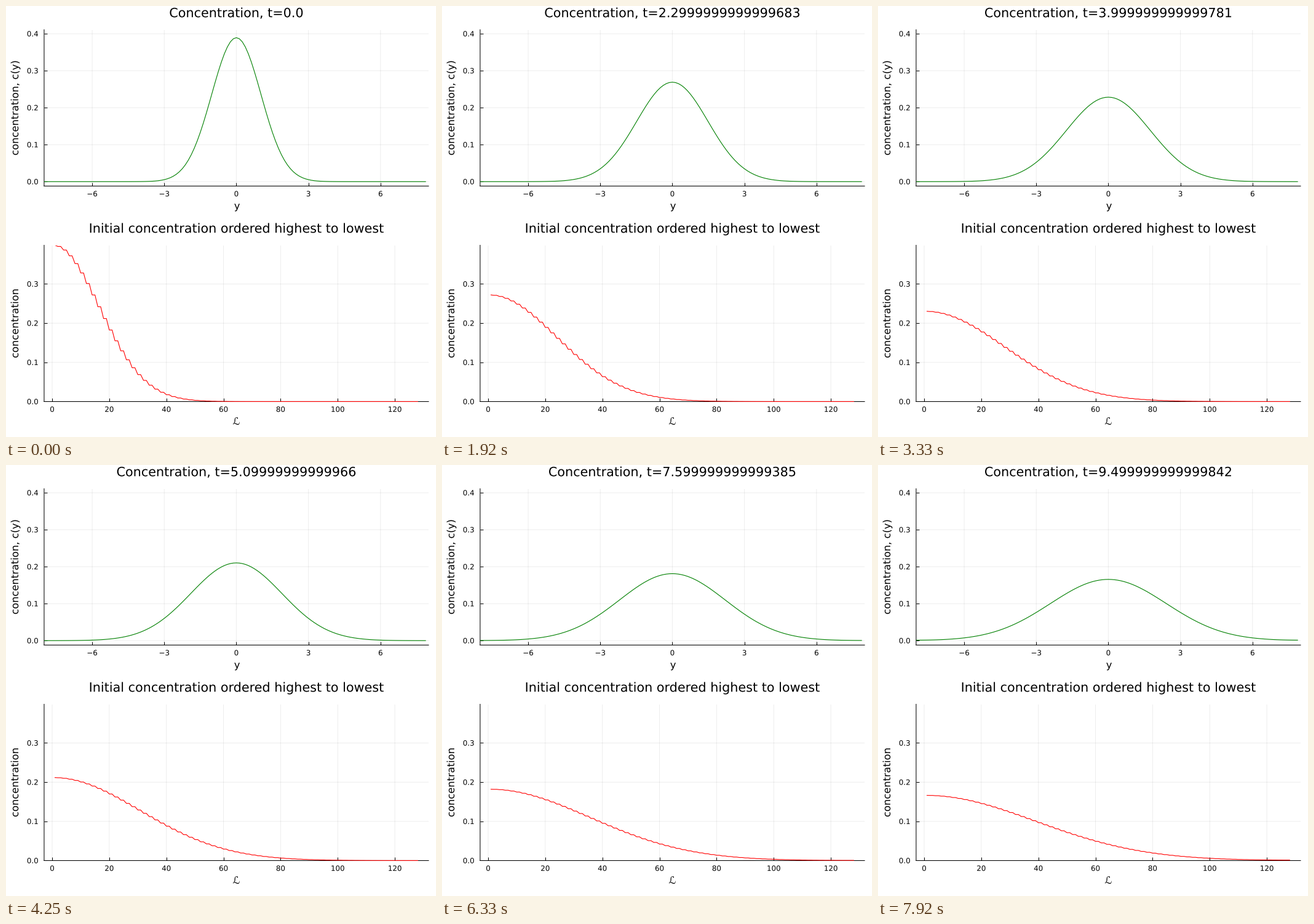
Animation of 699x700 px, one loop 8 s. Source, as a matplotlib script:

```python
from itertools import accumulate, repeat

import matplotlib.pyplot as plt
import numpy as np
from matplotlib.animation import FuncAnimation
from matplotlib.patches import PathPatch
from matplotlib.path import Path
from matplotlib.textpath import TextPath
from matplotlib.transforms import Affine2D

W, H, DPI = 699, 700, 100
LOOP_MS, TICK_MS, STATES = 8000, 20, 96
LEFT, RIGHT, HEIGHT = 61.95, 686.95, 253.95
MID = (LEFT + RIGHT) / 2
TITLE, LABEL, SMALL = 20.74, 16.3, 11.85
DT, STEPS = 0.002, 50

plt.rcParams.update({"font.family": "DejaVu Sans", "path.simplify": False})

# The clock is summed step by step, so its rounding drift shows in the title.
times = list(accumulate(repeat(DT, STEPS * (STATES - 1)), initial=0.0))[::STEPS]

y = -8 + 0.125 * np.arange(128)
rank = np.arange(1, 129)
peak = 1 / np.sqrt(2 * np.pi)


def concentration(t):
    """Spreading Gaussian on a periodic domain of width 16."""
    var = 1 + 0.5 * t
    waves = sum(np.exp(-(y + s) ** 2 / (2 * var)) for s in (-16, 0, 16))
    return waves / np.sqrt(2 * np.pi * var)


fig = plt.figure(figsize=(W / DPI, H / DPI), dpi=DPI, facecolor="white")
pixels = Affine2D().scale(1 / W, 1 / H) + fig.transFigure


def outline(text, size, x, base, align=0.5, turn=0):
    """Unhinted glyph outlines, aligned by advance width on a baseline."""
    def right_edge(s):
        return TextPath((0, 0), s, size=size).get_extents().x1

    width = right_edge(text + ".") - right_edge(".")
    place = Affine2D().translate(-align * width, 0).rotate_deg(turn)
    place.translate(x, H - base)
    return place.transform_path(TextPath((0, 0), text, size=size))


def put(*args, **kw):
    patch = PathPatch(outline(*args, **kw), facecolor="black", linewidth=0,
                      transform=pixels)
    return fig.add_artist(patch)


def panel(top, xlim, ylim, xticks, yticks, xlabel, ylabel, color):
    bottom = top + HEIGHT
    ax = fig.add_axes([LEFT / W, 1 - bottom / H,
                       (RIGHT - LEFT) / W, HEIGHT / H])
    ax.set(xlim=xlim, ylim=ylim, xticks=xticks, yticks=yticks)
    ax.patch.set_visible(False)
    ax.set_axisbelow(True)
    ax.grid(color="black", alpha=0.07, linewidth=0.72, snap=False)
    ax.tick_params(direction="in", length=3.6, width=0.72,
                   labelleft=False, labelbottom=False)
    ax.spines[["top", "right"]].set_visible(False)
    ax.spines[["left", "bottom"]].set(linewidth=0.75, snap=False)

    for v in xticks:
        x = np.interp(v, xlim, (LEFT, RIGHT))
        put(str(v).replace("-", "\u2212"), SMALL, x, bottom + 16.7)
    for v in yticks:
        base = np.interp(v, ylim, (bottom, top)) + 4.3
        put(f"{v:.1f}", SMALL, 52.7, base, align=1)
    put(xlabel, LABEL, MID, bottom + 37.6)
    put(ylabel, LABEL, 20, (top + bottom) / 2, turn=90)

    # The clip edge sits a quarter pixel low, so a zero line tints the axis.
    line, = ax.plot([], [], color=color, linewidth=0.8, zorder=3)
    line.set_clip_path(Path.unit_rectangle(),
                       Affine2D().translate(0, -0.25 / HEIGHT) + ax.transAxes)
    line.set_clip_box(None)
    return line


pad = 0.03
profile = panel(38.5, (-8, 8), (-pad * peak, (1 + pad) * peak),
                range(-6, 7, 3), [0, 0.1, 0.2, 0.3, 0.4],
                "y", "concentration, c(y)", "green")
ordered = panel(388.5, (1 - pad * 127, 128 + pad * 127), (0, peak),
                range(0, 121, 20), [0, 0.1, 0.2, 0.3],
                "\u2112", "concentration", "red")
put("Initial concentration ordered highest to lowest", TITLE, MID, 368.2)


def heading(t):
    return outline(f"Concentration, t={t}", TITLE, MID, 18.2)


headings = [heading(t) for t in times]
title = fig.add_artist(PathPatch(headings[0], facecolor="black", linewidth=0,
                                 transform=pixels))


def draw(tick):
    # States last 1/12 s, rounded to hundredths of a second.
    i = int((tick * TICK_MS + 14) * STATES // LOOP_MS)
    t = times[i]
    title.set_path(headings[i])
    profile.set_data(y, concentration(t + 0.1))
    ordered.set_data(rank, np.sort(concentration(t))[::-1])
    return title, profile, ordered


anim = FuncAnimation(fig, draw, frames=LOOP_MS // TICK_MS,
                     init_func=lambda: draw(0), interval=TICK_MS,
                     repeat=True, repeat_delay=0)
plt.show()
```
